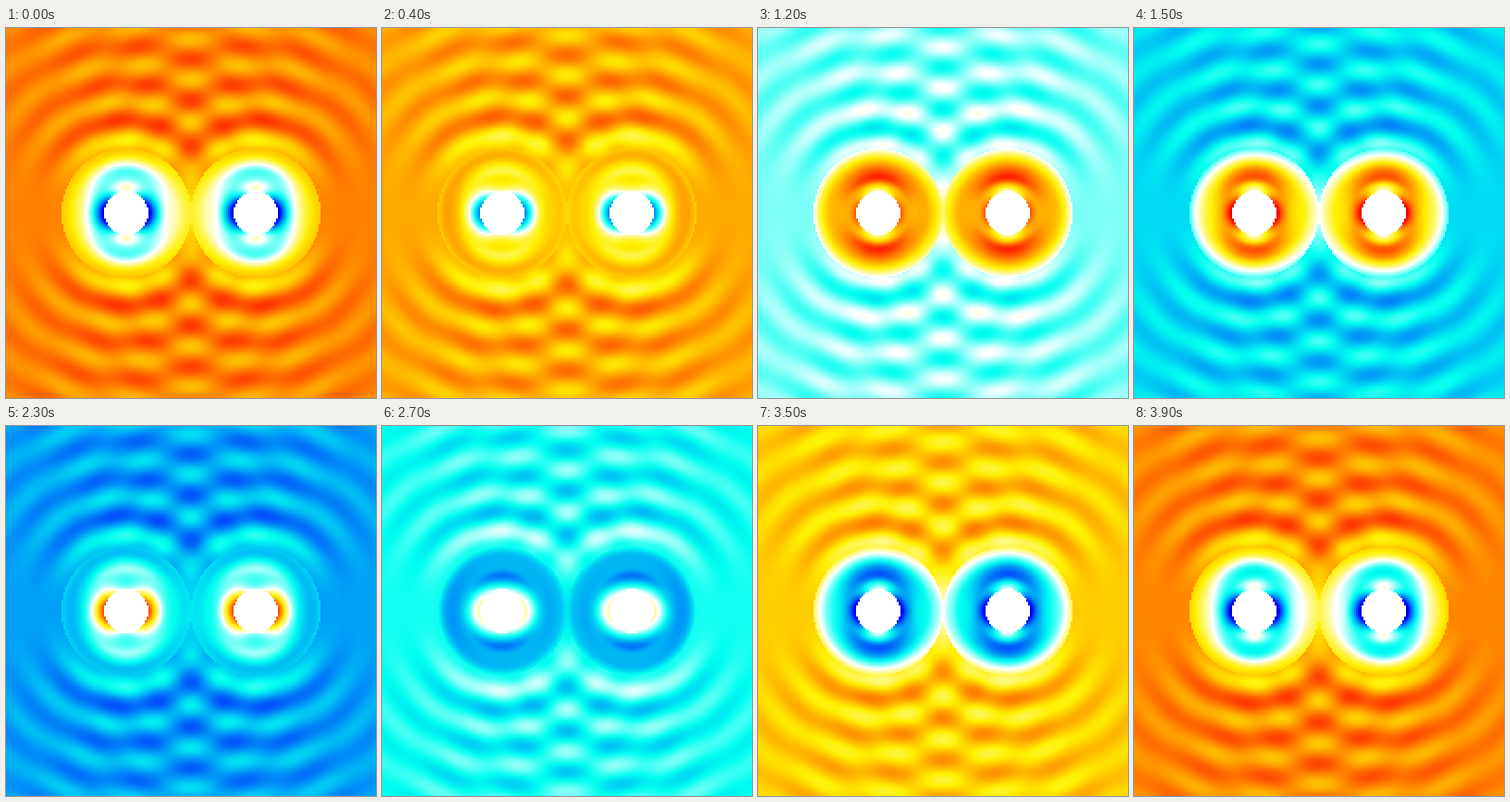
Write an HTML page with a canvas that moves like this. It is 400 px wide and 400 px high and loops after 4 s.

```html
<!DOCTYPE html>
<html>
<head>
<meta charset="utf-8">
<style>
  html, body { margin: 0; width: 100%; height: 100%; overflow: hidden; background: #fff; }
  canvas { display: block; width: 400px; height: 400px; image-rendering: pixelated; }
</style>
</head>
<body>
<canvas id="stage" width="200" height="200"></canvas>
<script>
const LOOP = 4000, STEP = 100, CELLS = 200, CELL = 2;
const SHELL = 70, CORE = 23.6, WAVELENGTH = 40;
const K = 2 * Math.PI / WAVELENGTH;
const LAG = 174 * Math.PI / 180;
const AMBIENT = [0.94, 0.04], SCATTER = 27;

// Radial profiles in the shell, sampled every 8 px from r = 22,
// as in-phase and quadrature parts along and across the polarisation.
const along = {
  re: [-2, -1, -0.28, 0.14, 0.37, 0.55, 0.65],
  im: [0.7, 0.55, 0.68, 0.82, 0.82, 0.62, 0.17]
};
const across = {
  re: [0.1, 0.08, -0.27, -0.34, 0.08, 0.52, 0.68],
  im: [0, 0.65, 1.28, 1.06, 0.82, 0.57, 0.17]
};

// Colours at the magnitudes in LEVELS, for either sign.
const LEVELS = [0, 0.5, 1.45, 2.5];
const WARM = [[255, 255, 255], [255, 240, 0], [255, 0, 0], [0, 0, 0]];
const COOL = [[255, 255, 255], [0, 255, 240], [0, 0, 255], [0, 0, 0]];

const clamp = (v, lo, hi) => Math.min(hi, Math.max(lo, v));

function spline(points, r) {
  const u = clamp((r - 22) / 8, 0, points.length - 1);
  const i = Math.min(Math.floor(u), points.length - 2), t = u - i;
  const b = points[i], c = points[i + 1];
  const a = i > 0 ? points[i - 1] : 2 * b - c;
  const d = i + 2 < points.length ? points[i + 2] : 2 * c - b;
  return b + 0.5 * t * (c - a + t * (2 * a - 5 * b + 4 * c - d + t * (3 * (b - c) + d - a)));
}

// dx is measured towards the other sphere.
function shellField(dx, r) {
  if (r < CORE) return [0, 0];
  const c = dx / r, c2 = c * c;
  const mix = part => spline(along[part], r) * c2 + spline(across[part], r) * (1 - c2);
  const coupling = c > 0 ? c2 * clamp((r - 42) / 12, 0, 1) : 0;
  const edge = clamp((r - 60) / 10, 0, 1);
  return [mix("re") - 0.22 * coupling, mix("im") + 0.25 * coupling * edge];
}

function outerField(y, r1, r2) {
  let [re, im] = AMBIENT;
  for (const r of [r1, r2]) {
    const s2 = (y / r) ** 2, amp = SCATTER / r * s2, phase = K * r + LAG;
    const near = s2 * Math.exp((SHELL - r) / 8);
    re += amp * Math.cos(phase) - 0.3 * near;
    im += amp * Math.sin(phase) - 0.3 * near;
  }
  const gap = Math.exp((2 * SHELL - r1 - r2) / 12);
  return [re - 0.45 * gap, im + 0.4 * gap];
}

function fieldAt(px, py) {
  const x = px - 200, y = py - 200;
  const r1 = Math.hypot(x + 70, y), r2 = Math.hypot(x - 70, y);
  if (r1 < SHELL) return shellField(x + 70, r1);
  if (r2 < SHELL) return shellField(70 - x, r2);
  return outerField(y, r1, r2);
}

const ctx = document.getElementById("stage").getContext("2d");
const image = ctx.createImageData(CELLS, CELLS);
const field = new Float32Array(CELLS * CELLS * 2);
for (let j = 0; j < CELLS; j++) {
  for (let i = 0; i < CELLS; i++) {
    field.set(fieldAt((i + 0.5) * CELL, (j + 0.5) * CELL), 2 * (j * CELLS + i));
  }
}

function paint(angle) {
  const c = Math.cos(angle), s = Math.sin(angle), px = image.data;
  for (let n = 0; n < CELLS * CELLS; n++) {
    const v = field[2 * n] * c + field[2 * n + 1] * s, m = Math.abs(v);
    const stops = v > 0 ? WARM : COOL;
    const k = m < LEVELS[1] ? 0 : m < LEVELS[2] ? 1 : 2;
    const t = clamp((m - LEVELS[k]) / (LEVELS[k + 1] - LEVELS[k]), 0, 1);
    for (let ch = 0; ch < 3; ch++) {
      px[4 * n + ch] = stops[k][ch] + (stops[k + 1][ch] - stops[k][ch]) * t;
    }
    px[4 * n + 3] = 255;
  }
  ctx.putImageData(image, 0, 0);
}

const start = performance.now();
let shown = -1;
function tick() {
  const step = Math.floor((performance.now() - start) % LOOP / STEP);
  if (step !== shown) {
    shown = step;
    paint(2 * Math.PI * step * STEP / LOOP);
  }
  requestAnimationFrame(tick);
}
tick();
</script>
</body>
</html>
```
